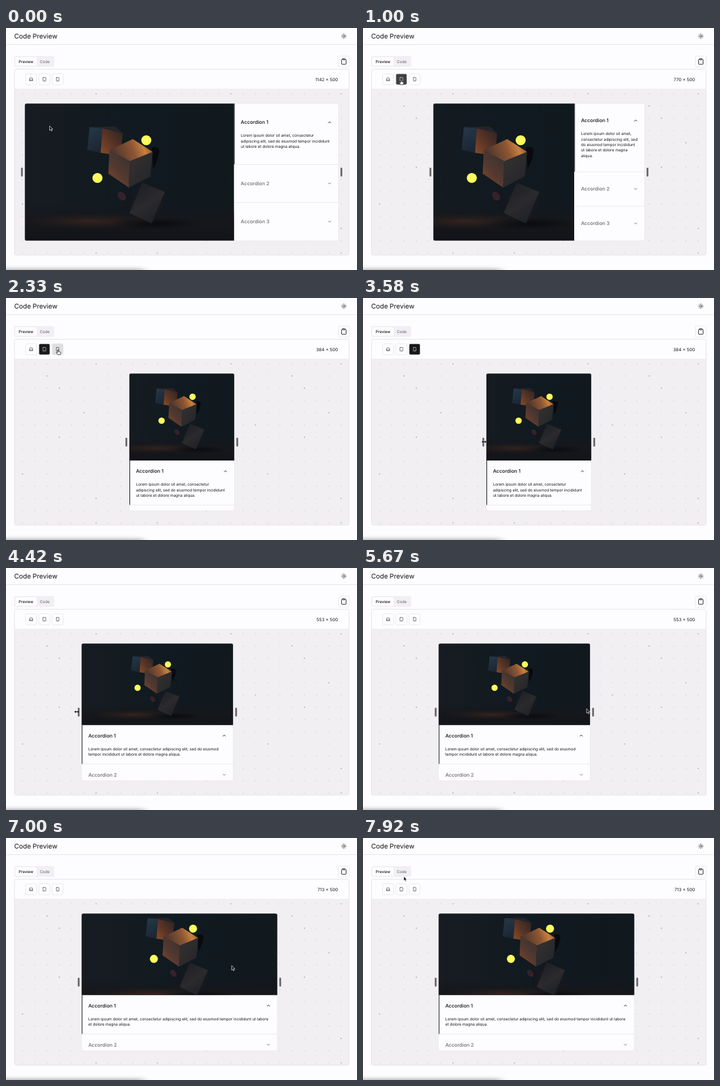
Write an HTML page that moves like this. It is 600 by 414 pixels and loops after 8000 ms.

```html
<!DOCTYPE html>
<html lang="en">
<head>
<meta charset="utf-8">
<title>Code Preview</title>
<style>
  html, body { margin: 0; width: 100%; height: 100%; overflow: hidden; background: #fdfcfe; }
  svg { display: block; width: 100vw; height: 100vh; }
  text { font-family: Inter, sans-serif; text-rendering: geometricPrecision; white-space: pre; }
  .icon { fill: none; stroke: currentColor; stroke-width: 2; stroke-linecap: round; stroke-linejoin: round; }
</style>
</head>
<body>
<svg id="stage" viewBox="0 0 600 414">
  <defs>
    <linearGradient id="wall" x1="0" y1="0" x2="1" y2="0">
      <stop offset="0" stop-color="#171c22"/><stop offset=".5" stop-color="#101a20"/><stop offset="1" stop-color="#11181e"/>
    </linearGradient>
    <linearGradient id="floor" x1="0" y1="0" x2="0" y2="1">
      <stop offset="0" stop-color="#15161b" stop-opacity="0"/><stop offset=".45" stop-color="#17171b"/><stop offset="1" stop-color="#111419"/>
    </linearGradient>
    <radialGradient id="glow">
      <stop offset="0" stop-color="#40291f" stop-opacity=".7"/><stop offset="1" stop-color="#2a1f1d" stop-opacity="0"/>
    </radialGradient>
    <radialGradient id="shade">
      <stop offset="0" stop-color="#07090c" stop-opacity=".8"/><stop offset="1" stop-color="#07090c" stop-opacity="0"/>
    </radialGradient>
    <linearGradient id="backL" x1="0" y1="0" x2=".3" y2="1">
      <stop offset="0" stop-color="#26384a"/><stop offset="1" stop-color="#1c2733"/>
    </linearGradient>
    <linearGradient id="backR" x1="0" y1="1" x2="1" y2="0">
      <stop offset="0" stop-color="#8c4d29"/><stop offset=".45" stop-color="#5a3526"/><stop offset="1" stop-color="#2a2223"/>
    </linearGradient>
    <linearGradient id="mainT" x1="0" y1=".6" x2="1" y2=".4">
      <stop offset="0" stop-color="#44312c"/><stop offset=".55" stop-color="#8d5633"/><stop offset=".8" stop-color="#c9803f"/><stop offset="1" stop-color="#8a5230"/>
    </linearGradient>
    <linearGradient id="mainL" x1="0" y1="1" x2=".7" y2="0">
      <stop offset="0" stop-color="#87482a"/><stop offset=".5" stop-color="#54392f"/><stop offset="1" stop-color="#3b3230"/>
    </linearGradient>
    <linearGradient id="mainR" x1="0" y1="0" x2="1" y2="1">
      <stop offset="0" stop-color="#36312f"/><stop offset="1" stop-color="#22252b"/>
    </linearGradient>
    <linearGradient id="low" x1="0" y1="0" x2=".6" y2="1">
      <stop offset="0" stop-color="#1a1d23"/><stop offset=".6" stop-color="#2b2a2d"/><stop offset="1" stop-color="#1e2127"/>
    </linearGradient>
    <filter id="blur" x="-20%" y="-200%" width="140%" height="500%"><feGaussianBlur stdDeviation="8 3"/></filter>
    <clipPath id="clip"><rect id="clipBox" y="129" height="235" rx="3"/></clipPath>
    <clipPath id="shotClip"><rect id="shotBox" y="129"/></clipPath>
    <g id="art">
      <rect x="-209" y="-118" width="418" height="236" fill="url(#wall)"/>
      <rect x="-209" y="55" width="418" height="63" fill="url(#floor)"/>
      <ellipse cx="-65" cy="84" rx="125" ry="14" fill="url(#glow)"/>
      <ellipse cx="45" cy="88" rx="80" ry="11" fill="url(#shade)"/>
      <path d="M38-42q10-3 13 4q0 14-10 32z" fill="#080a0d"/>
      <path d="M-68-77l22 2-3 42-23-5z" fill="url(#backL)"/>
      <path d="M-46-75l24-1 11 10-4 38-34-5z" fill="url(#backR)"/>
      <path d="M-68-77l44-1 13 12-35-9z" fill="#252429"/>
      <path d="M-20 39l14-8 20 21-12 20z" fill="#14171d"/>
      <ellipse cx="-13" cy="41" rx="6" ry="8.5" transform="rotate(-38 -13 41)" fill="#34222a"/>
      <path d="M22 18l39 16-23 54-38-18z" fill="url(#low)"/>
      <path d="M22 18l-17 22-5 30z" fill="#16191f"/>
      <path d="M61 34l-2 21-21 33z" fill="#17191f"/>
      <path d="M-34-37.5L6-56.5 40-34.5 1-18.5z" fill="url(#mainT)"/>
      <path d="M-34-37.5L1-18.5-1 26.5-36 2.5z" fill="url(#mainL)"/>
      <path d="M1-18.5L40-34.5 36 7.5-1 26.5z" fill="url(#mainR)"/>
      <circle cx="29" cy="-54.5" r="8.6" fill="#fcfc5c"/>
      <circle cx="-54.5" cy="10" r="8.6" fill="#fcfc5c"/>
    </g>
  </defs>
  <g id="page"></g>
  <g id="buttons"></g>
  <text id="size" x="567.5" y="90.6" font-size="7.52" text-anchor="end" fill="#18181b"></text>
  <g id="card"></g>
  <g id="cursor"></g>
</svg>
<script>
const LOOP = 8000, TOP = 129, HEIGHT = 235, SCALE = 0.4697;
const INK = '#111114', MUTED = '#6d6c72', LINE = '#e4e3e8', PAPER = '#fdfcfe';
const BODY = 14 * SCALE, TITLE = 18 * SCALE, LEAD = 20 * SCALE;
const LOREM = 'Lorem ipsum dolor sit amet, consectetur adipiscing elit, sed do eiusmod tempor incididunt ut labore et dolore magna aliqua.';
const $ = id => document.getElementById(id);

const rect = (x, y, w, h, fill, more = '') =>
  `<rect x="${x}" y="${y}" width="${w}" height="${h}" fill="${fill}" ${more}/>`;
const text = (x, y, str, size, fill = INK, weight = 400) =>
  `<text x="${x}" y="${y}" font-size="${size}" font-weight="${weight}" fill="${fill}">${str}</text>`;
const icon = (cx, cy, size, color, shape) =>
  `<g class="icon" color="${color}" transform="translate(${cx - size / 2} ${cy - size / 2}) scale(${size / 24})">${shape}</g>`;
const framed = `rx="2.5" stroke="${LINE}" stroke-width=".8"`;

const ICONS = {
  laptop: '<path d="M20 16V7a2 2 0 0 0-2-2H6a2 2 0 0 0-2 2v9m16 0H4m16 0 1.3 2.5a1 1 0 0 1-.9 1.5H3.6a1 1 0 0 1-.9-1.5L4 16"/>',
  tablet: '<rect x="4" y="2" width="16" height="20" rx="2"/><path d="M12 18h.01"/>',
  phone: '<rect x="5" y="2" width="14" height="20" rx="2"/><path d="M12 18h.01"/>',
  clipboard: '<rect x="8" y="2" width="8" height="4" rx="1"/><path d="M16 4h2a2 2 0 0 1 2 2v14a2 2 0 0 1-2 2H6a2 2 0 0 1-2-2V6a2 2 0 0 1 2-2h2"/>',
  sun: '<circle cx="12" cy="12" r="4"/>' + [0, 45, 90, 135, 180, 225, 270, 315]
    .map(a => `<path d="M12 2v2" transform="rotate(${a} 12 12)"/>`).join('')
};

// Dot grid; the darker dots repeat every 20 columns.
const STRONG = new Set(['2,1', '6,0', '3,2', '3,6', '0,9', '19,5', '6,11', '11,13', '6,13', '17,0', '5,4', '15,12']);
function dots() {
  let out = '';
  for (let r = 0; r < 14; r++)
    for (let c = 0; c < 27; c++) {
      const strong = STRONG.has(`${c % 20},${r}`);
      out += `<circle cx="${28.3 + c * 20.95}" cy="${112.5 + r * 20.95}" r="${strong ? 1.1 : 0.9}" fill="${strong ? '#b0afb4' : '#d6d5da'}"/>`;
    }
  return out;
}

$('page').innerHTML =
  rect(0, 0, 600, 414, PAPER) +
  text(14, 18, 'Code Preview', 24 * SCALE) +
  rect(0, 28, 600, 1, LINE) +
  icon(577.5, 14, 10, INK, ICONS.sun) +
  rect(14, 48, 68.5, 18.5, '#f1eff3', 'rx="3"') +
  rect(16, 50, 36.5, 14.5, PAPER, 'rx="2"') +
  text(21.8, 59.6, 'Preview', BODY, INK, 500) +
  text(58, 59.6, 'Code', BODY, '#737278', 500) +
  rect(568, 48, 19, 19, PAPER, framed) +
  icon(577.5, 57.3, 11.5, INK, ICONS.clipboard) +
  rect(14.5, 70.5, 572, 318, '#f1eff2', 'rx="3"') +
  `<path d="M14.5 105V73.5a3 3 0 0 1 3-3h566a3 3 0 0 1 3 3V105z" fill="${PAPER}"/>` +
  rect(14.5, 104.5, 572, 0.8, LINE) +
  dots() +
  rect(14.5, 70.5, 572, 318, 'none', `rx="3" stroke="${LINE}"`) +
  rect(-20, 412, 255, 10, '#000', 'opacity=".3" filter="url(#blur)"');

const clamp = v => Math.min(1, Math.max(0, v));
const smooth = v => (v = clamp(v), v * v * (3 - 2 * v));
const mix = (a, b, p) => a + (b - a) * p;

// Value of a list of [time, ...numbers] keys at time t.
function track(keys, t, ease = clamp) {
  let i = keys.findIndex(k => k[0] > t);
  if (i < 0) return keys[keys.length - 1].slice(1);
  if (i === 0) return keys[0].slice(1);
  const a = keys[i - 1], b = keys[i], p = ease((t - a[0]) / (b[0] - a[0]));
  return a.slice(1).map((v, n) => mix(v, b[n + 1], p));
}

const pen = document.createElement('canvas').getContext('2d');
pen.font = '400 100px Inter, sans-serif';
function wrap(str, width) {
  const lines = [];
  let line = '';
  for (const word of str.split(' ')) {
    const next = line ? line + ' ' + word : word;
    if (line && pen.measureText(next).width * BODY / 100 > width) {
      lines.push(line);
      line = word;
    } else line = next;
  }
  return [...lines, line];
}

function frameAt(t) {
  if (t < 915) return [32, 568.5, 1142];
  if (t < 2320) return [120, 481.5, 770];
  if (t < 5000) {
    const p = smooth((t - 3620) / 700);
    return [mix(210.5, 129, p), mix(390.5, 388.5, p), mix(384, 553, p)];
  }
  const p = smooth((t - 5880) / 515);
  return [129, mix(388.5, 464, p), mix(553, 713, p)];
}

function drawCard(left, right, px) {
  const width = right - left, wide = px >= 768;
  const x = wide ? left + width * 2 / 3 : left;
  const panel = right - x;
  const lines = wrap(LOREM, panel - 22.6);
  const shotW = wide ? x - left : width;
  const shotH = wide ? HEIGHT : lines.length > 2 ? 149 : 139.5;
  const openH = 48 + LEAD * lines.length, shutH = 37;
  const spare = wide ? (HEIGHT - openH - 2 * shutH) / 3 : 0;
  const zoom = Math.max(shotW / 418, shotH / 235);

  for (const [k, v] of Object.entries({ x: left, width })) $('clipBox').setAttribute(k, v);
  for (const [k, v] of Object.entries({ x: left, width: shotW, height: shotH })) $('shotBox').setAttribute(k, v);

  let y = wide ? TOP : TOP + shotH, panelMarkup = '';
  for (let i = 0; i < 3; i++) {
    const h = (i ? shutH : openH) + spare;
    const mid = y + 18.3 + spare / 2, color = i ? MUTED : INK, d = i ? 1 : -1;
    panelMarkup += text(x + 11.7, mid + 3, 'Accordion ' + (i + 1), TITLE, color, 500) +
      `<path d="M${right - 17.5} ${mid - d}l2.1 ${2.1 * d} 2.1 ${-2.1 * d}" fill="none" stroke="${color}" stroke-width=".95" stroke-linecap="round" stroke-linejoin="round"/>`;
    if (!i) {
      panelMarkup += lines.map((s, n) => text(x + 11.7, mid + 25 + n * LEAD, s, BODY)).join('') +
        rect(wide ? x - 0.4 : x + 0.3, y, wide ? 1.8 : 1.3, h, wide ? '#55545a' : '#1c1c20');
    }
    y += h;
    if (i < 2) panelMarkup += rect(x, y - 0.4, panel, 0.8, LINE);
  }

  const handle = cx => rect(cx - 1.5, 239, 3, 15.2, '#66656b', 'rx="1.4"');
  $('card').innerHTML =
    `<g clip-path="url(#clip)">${rect(left, TOP, width, HEIGHT, PAPER)}${panelMarkup}` +
    `<g clip-path="url(#shotClip)"><use href="#art" transform="translate(${left + shotW / 2} ${TOP + shotH / 2}) scale(${zoom})"/></g></g>` +
    rect(left, TOP, width, HEIGHT, 'none', `rx="3" stroke="${LINE}" stroke-width=".6"`) +
    handle(left - 4.8) + handle(right + 4.8);
}

// Button shades as grey levels over time: resting, hovered, pressed-in.
const REST = 253, HOVER = 224, ACTIVE = 24, ACTIVE_HOVER = 64;
const SHADES = {
  laptop: [[0, REST]],
  tablet: [[860, REST], [910, HOVER], [1000, ACTIVE_HOVER], [1930, ACTIVE_HOVER], [2080, ACTIVE], [2330, ACTIVE], [2480, REST]],
  phone: [[2060, REST], [2180, HOVER], [2330, HOVER], [2480, ACTIVE_HOVER], [2620, ACTIVE_HOVER], [2760, ACTIVE], [3620, ACTIVE], [3770, REST]]
};
function drawButtons(t) {
  $('buttons').innerHTML = Object.keys(SHADES).map((name, i) => {
    const [v] = track(SHADES[name], t), x = 33.5 + i * 22.7;
    return rect(x, 78.3, 18.8, 18.8, `rgb(${v},${v},${Math.min(255, v + 2)})`, framed) +
      icon(x + 9.4, 87.7, 7.5, v < 140 ? '#f4f3f6' : '#222226', ICONS[name]);
  }).join('');
}

const PATH = [
  [0, 74.5, 167.5], [250, 71, 160], [600, 46, 114], [830, 53.5, 92], [930, 65, 88.5], [1900, 65, 88.5],
  [2120, 89, 88.5], [2580, 89, 88.5], [2950, 160, 165], [3380, 207, 246], [3620, 207, 246], [4320, 121, 246],
  [4520, 121, 246], [5000, 225, 170], [5800, 394, 246], [5880, 394, 246], [6250, 464.5, 246], [6420, 474, 246],
  [6750, 474, 246], [7500, 136, 140], [7900, 69.7, 65.7]
];
const POINTERS = {
  arrow: '<path d="M0 0v7.6l1.8-1.6 1.2 2.8 1.4-.6-1.2-2.7h2.4z" fill="#111" stroke="#fff" stroke-width=".7" stroke-linejoin="round"/>',
  hand: '<path d="M-.8.6q.8-1.2 1.6 0v2.6l3 .7q.9.3.7 1.3l-.6 3.2H-.6L-3.2 5q0-1.2 1.2-.7l1.2.9z" fill="#fff" stroke="#111" stroke-width=".8" stroke-linejoin="round"/>',
  resize: '<path d="M-4.2 0l2.4-2.2v1.5h3.6v-1.5L4.2 0 1.8 2.2V.7h-3.6v1.5z" fill="#111" stroke="#fff" stroke-width=".6" stroke-linejoin="round" paint-order="stroke"/>'
};
const within = (t, ...spans) => spans.some(([a, b]) => t >= a && t < b);
function drawCursor(t) {
  const [x, y] = track(PATH, t, smooth);
  const kind = within(t, [880, 2010], [2060, 2660]) ? 'hand' : within(t, [3350, 4560], [5760, 6780]) ? 'resize' : 'arrow';
  $('cursor').innerHTML = `<g transform="translate(${x} ${y})">${POINTERS[kind]}</g>`;
}

let shown = '';
function draw(t) {
  const box = frameAt(t);
  if (box.join() !== shown) {
    shown = box.join();
    drawCard(...box);
    $('size').textContent = Math.round(box[2]) + ' × 500';
  }
  drawButtons(t);
  drawCursor(t);
}

const start = performance.now();
function tick() {
  draw((performance.now() - start) % LOOP);
  requestAnimationFrame(tick);
}
tick();
</script>
</body>
</html>
```
